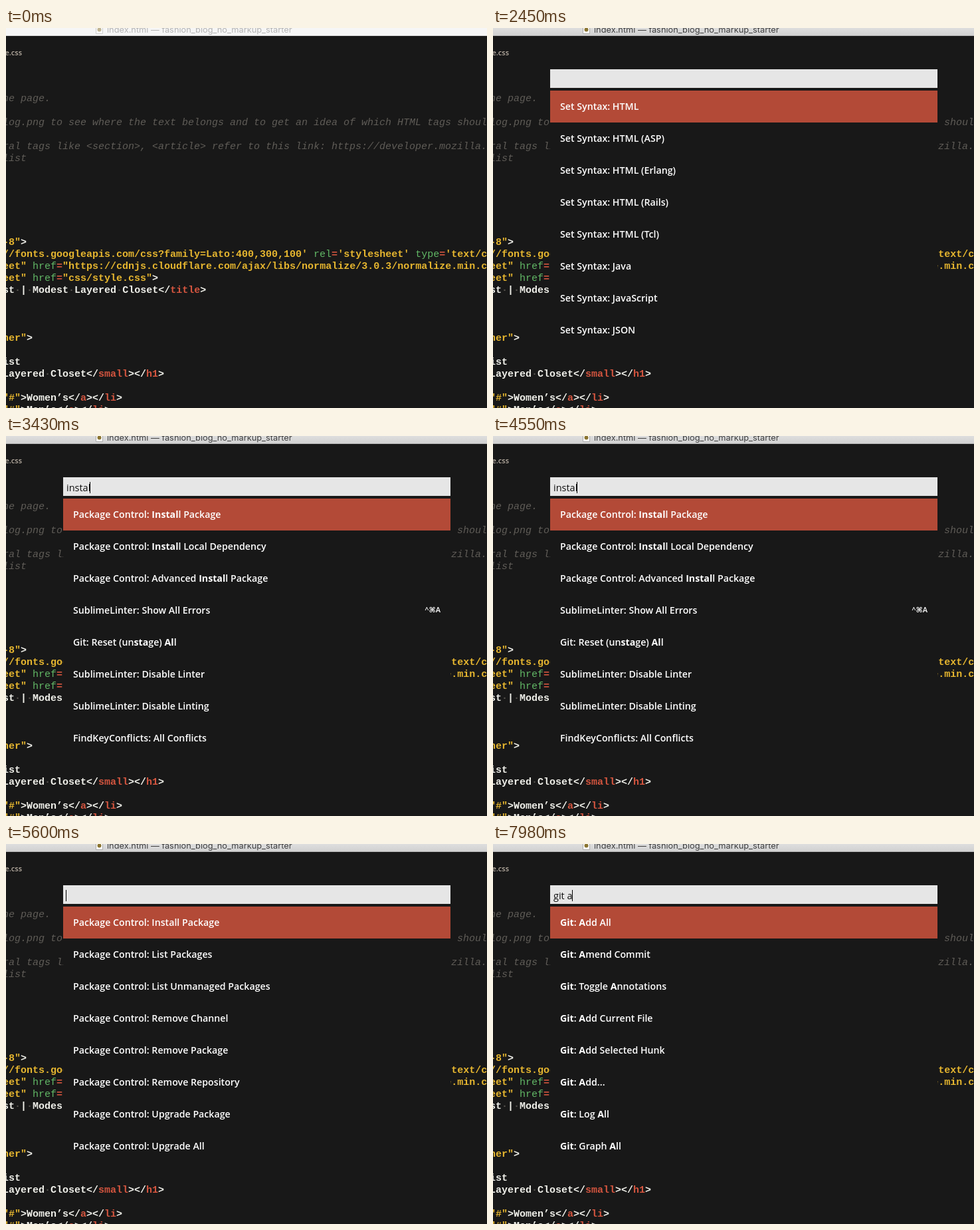
Recreate the animation shown at these times as an HTML page. Size 724 by 571 pixels, loop 8000 ms.

```html
<!DOCTYPE html>
<html lang="en">
<head>
<meta charset="utf-8">
<title>Command palette</title>
<style>
html, body { margin: 0; width: 100%; height: 100%; overflow: hidden; background: #181818; }
svg { display: block; }
text { white-space: pre; }
.code text { font: bold 15px "Liberation Mono", monospace; fill: #f0f0ea; }
.code .c { font-weight: normal; font-style: italic; fill: #5f5c57; }
.y { fill: #e6b62f; }
.g { fill: #62b866; font-weight: normal; }
.r { fill: #d4553f; }
.d { fill: #55524e; }
.tab { font: 600 11px "Open Sans", sans-serif; fill: #b9afa3; }
.bar text { font: 12.8px Inter, sans-serif; }
.panel text { font: 600 14.2px "Open Sans", "DejaVu Sans", sans-serif; fill: #fff; }
.panel .b { font-weight: 700; }
.panel .hint { font-size: 11px; text-anchor: end; }
.panel #query { font-size: 14.5px; font-weight: 400; fill: #111; }
</style>
</head>
<body>
<svg width="724" height="571" viewBox="0 0 724 571">
  <defs>
    <linearGradient id="active" x2="0" y2="1"><stop stop-color="#dedede"/><stop offset="1" stop-color="#d0d0d0"/></linearGradient>
  </defs>
  <rect width="724" height="571" fill="#181818"/>
  <g class="bar">
    <rect id="bar" width="724" height="12"/>
    <rect id="edge" y="11" width="724" height="1"/>
    <g id="icon">
      <path d="M135.5 -4V8.500H145.500V-4" fill="#fff" stroke="#aaa"/>
      <circle cx="140.500" cy="2.500" r="3" fill="#8a7430"/>
    </g>
    <text id="title" x="152" y="6.500">index.html — fashion_blog_no_markup_starter</text>
  </g>
  <text class="tab" x="24" y="41" text-anchor="end">style.css</text>
  <g class="code">
    <text class="c" x="-5" y="110">ne page.</text>
    <text class="c" x="-5" y="146">log.png to see where the text belongs and to get an idea of which HTML tags should</text>
    <text class="c" x="-5" y="182">ral tags like &lt;section>, &lt;article> refer to this link: https://developer.mozilla.org</text>
    <text class="c" x="-5" y="200">list</text>
    <text x="-5" y="326"><tspan class="y">-8"</tspan>></text>
    <text x="-5" y="344"><tspan class="y">//fonts.googleapis.com/css?family=Lato:400,300,100'</tspan> <tspan class="g">rel</tspan><tspan class="r">=</tspan><tspan class="y">'stylesheet'</tspan> <tspan class="g">type</tspan><tspan class="r">=</tspan><tspan class="y">'text/css'</tspan></text>
    <text x="-5" y="362"><tspan class="y">eet"</tspan> <tspan class="g">href</tspan><tspan class="r">=</tspan><tspan class="y">"https://cdnjs.cloudflare.com/ajax/libs/normalize/3.0.3/normalize.min.css"</tspan></text>
    <text x="-5" y="380"><tspan class="y">eet"</tspan> <tspan class="g">href</tspan><tspan class="r">=</tspan><tspan class="y">"css/style.css"</tspan>></text>
    <text x="-5" y="398">st<tspan class="d">·</tspan>|<tspan class="d">·</tspan>Modest<tspan class="d">·</tspan>Layered<tspan class="d">·</tspan>Closet&lt;/<tspan class="r">title</tspan>></text>
    <text x="-5" y="470"><tspan class="y">ner"</tspan>></text>
    <text x="-5" y="506">ist</text>
    <text x="-5" y="524">Layered<tspan class="d">·</tspan>Closet&lt;/<tspan class="r">small</tspan>>&lt;/<tspan class="r">h1</tspan>></text>
    <text x="-5" y="560"><tspan class="y">"#"</tspan>>Women’s&lt;/<tspan class="r">a</tspan>>&lt;/<tspan class="r">li</tspan>></text>
    <text x="-5" y="578"><tspan class="y">"#"</tspan>>Men’s&lt;/<tspan class="r">a</tspan>>&lt;/<tspan class="r">li</tspan>></text>
  </g>
  <g class="panel" id="panel">
    <rect x="86" y="62" width="583" height="400" fill="#181818"/>
    <rect x="86" y="62" width="583" height="28" fill="#e6e6e6"/>
    <rect id="selection" x="91" y="68" height="19" fill="#a3bac8"/>
    <text id="query" x="91" y="83"></text>
    <rect id="caret" y="69" width="1" height="17"/>
    <svg id="list" x="86" y="94" width="583" height="368"></svg>
  </g>
</svg>
<script>
const LOOP = 8000, ROW = 48;
const $ = id => document.getElementById(id);
const group = (prefix, names) => names.split(', ').map(name => prefix + name);

// Rows are "label|hint"; asterisks mark extra bold letters.
const install = group('Package Control: ', 'Install Package, Install Local Dependency');
const advanced = 'Package Control: Advanced Install Package';
const browser = group('File: Open *In* Browser – ', 'Testing *S*erver, Production *S*erver');
const linter = group('SublimeLinter: ', 'Disable Linter, Disable Linting');
const unstage = 'Git: Reset (un*sta*ge) *Al*l';
const conflicts = 'FindKeyConflicts: All Conflicts';
const indentation = group('Indentation: ', 'Convert to Spaces, Convert to Tabs, Reindent Lines');
const gitMain = group('Git: ', 'Blame, Commit, Fetch, Gitk, Gui, Pull, Push, Status');

const lists = {
  syntax: { rows: [...group('Set Syntax: ', 'HTML, HTML (Rails), HTML (Tcl), HTML (Erlang), HTML (ASP)'),
    'Snippet: html|html,tab', 'Snippet: html|html,tab', 'Snippet: QUnit HTML|qhtml,tab'] },
  syntaxAll: { rows: group('Set Syntax: ', 'HTML, HTML (ASP), HTML (Erlang), HTML (Rails), HTML (Tcl), Java, JavaScript, JSON') },
  packageAll: { rows: group('Package Control: ', 'Install Package, List Packages, List Unmanaged Packages, ' +
    'Remove Channel, Remove Package, Remove Repository, Upgrade Package, Upgrade All') },
  i: { rows: [...indentation, ...install, 'Git: Init', ...browser], selected: 3 },
  input: { rows: [...group('Snippet: input – ', 'search|inputs, submit|inputs, tel|inputt, text|inputt, ' +
    'time|inputt, url|inputu, week|inputw').map(row => row + ',tab'), install[0]], selected: 7, scroll: 16 },
  ins: { rows: [...install, ...browser, advanced, 'Markdown Preview: Export HTML *in* *S*ublime Text',
    'View: Toggle Open Files *in* *S*ide Bar', 'Bu*i*ld: *N*ew Build *S*ystem'] },
  inst: { rows: [...install, advanced, ...browser, unstage, ...linter] },
  instal: { rows: [...install, advanced, 'SublimeLinter: Show All Errors|^⌘A', unstage, ...linter, conflicts] },
  git: { rows: gitMain },
  gitSpace: { rows: ['Git: Init', ...gitMain.slice(0, 7)], selected: 1 },
  gitAdd: { rows: group('Git: ', 'Add All, Amend Commit, Toggle Annotations, Add Current File, ' +
    'Add Selected Hunk, Add..., Log All, Graph All') },
};

const steps = [
  [1400, 'set html', 'syntax'], [1960, '', 'syntaxAll'],
  [2660, 'i', 'i'], [2800, 'in', 'i'], [2940, 'ins', 'ins'], [3080, 'inst', 'inst'],
  [3290, 'insta', 'inst'], [3430, 'instal', 'instal'], [3640, 'install', 'instal'],
  [4550, 'instal', 'instal'], [4690, 'insta', 'inst'], [4830, 'inst', 'inst'],
  [5040, 'ins', 'ins'], [5250, 'in', 'input'], [5390, 'i', 'i'], [5600, '', 'packageAll'],
  [7280, 'g', 'git'], [7420, 'gi', 'git'], [7560, 'git', 'git'], [7770, 'git ', 'gitSpace'], [7980, 'git a', 'gitAdd'],
];
const blinks = [1610, 2310, 3990, 6090, 6790];

function highlight(label, query) {
  for (const word of query.split(' ').filter(Boolean))
    label = label.replace(new RegExp('\\b' + word, 'i'), '*$&*');
  return label.replace(/\*([^*]+)\*/g, '<tspan class="b">$1</tspan>');
}

function showStep([, query, name]) {
  const { rows, selected = 0, scroll = 0 } = lists[name];
  $('query').textContent = query;
  const width = query ? $('query').getComputedTextLength() : 0;
  $('caret').setAttribute('x', Math.round(90 + width));
  $('selection').setAttribute('width', query === 'set html' ? width : 0);
  $('list').innerHTML =
    `<rect y="${selected * ROW - scroll}" width="583" height="${ROW}" fill="#b34a37"/>` +
    rows.map((row, i) => {
      const [label, hint = ''] = row.split('|');
      const y = i * ROW - scroll + 29;
      return `<text x="15" y="${y}">${highlight(label, query)}</text><text class="hint" x="568" y="${y - 2}">${hint}</text>`;
    }).join('');
}

function caretOpacity(t) {
  const start = blinks.findLast(b => b <= t);
  const age = t - start;
  return age < 140 ? 0.5 : age < 280 ? 0 : 1;
}

let current;
function draw(now) {
  const t = now % LOOP;
  const focused = t >= 420;
  $('bar').setAttribute('fill', focused ? 'url(#active)' : '#f6f6f6');
  $('edge').setAttribute('fill', focused ? '#b6b6b6' : '#dcdcdc');
  $('title').setAttribute('fill', focused ? '#404040' : '#b4b4b4');
  $('icon').setAttribute('opacity', focused ? 1 : 0.5);

  const step = steps.findLast(s => s[0] <= t);
  $('panel').style.display = step ? '' : 'none';
  if (step && step !== current) showStep(step);
  current = step;
  $('caret').setAttribute('opacity', caretOpacity(t));
  requestAnimationFrame(draw);
}
requestAnimationFrame(draw);
</script>
</body>
</html>
```
